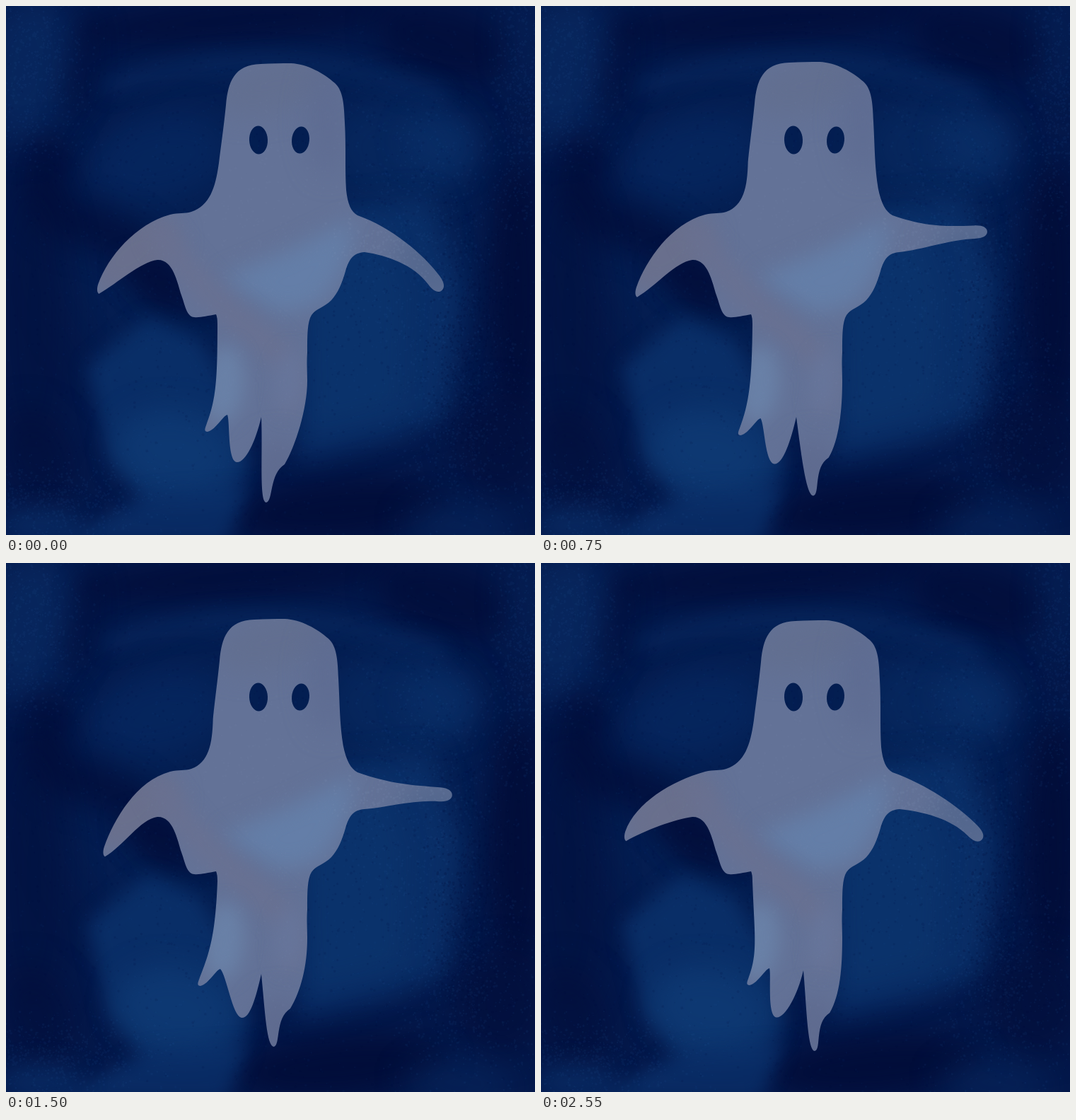
An HTML page with a canvas that plays this animation: 748 px wide and 748 px high, repeating every 2.7 s.

```html
<!DOCTYPE html>
<html lang="en">
<head>
<meta charset="utf-8">
<title>Ghost</title>
<style>
html, body { margin: 0; width: 100%; height: 100%; overflow: hidden; background: #04174a; }
canvas { display: block; width: 748px; height: 748px; }
</style>
</head>
<body>
<canvas id="stage" width="748" height="748"></canvas>
<script>
const SIZE = 748, STEP = 150, STEPS = 18, RAD = Math.PI / 180;
const ctx = document.getElementById('stage').getContext('2d');

let seed = 7;
function rnd() {
  seed = (seed * 16807) % 2147483647;
  return seed / 2147483647;
}

function layer(fill) {
  const c = document.createElement('canvas');
  c.width = c.height = SIZE;
  const g = c.getContext('2d');
  g.fillStyle = fill;
  g.fillRect(0, 0, SIZE, SIZE);
  return g;
}

// Soft painted area.
function patch(g, path, rgb, alpha, blur) {
  g.filter = `blur(${blur}px)`;
  g.fillStyle = `rgba(${rgb},${alpha})`;
  g.fill(new Path2D(path));
  g.filter = 'none';
}

function dab(g, x, y, rx, ry, turn, rgb, alpha, blur = 20) {
  patch(g, `M${x - rx * Math.cos(turn * RAD)} ${y - rx * Math.sin(turn * RAD)}
    a${rx} ${ry} ${turn} 1 1 ${2 * rx * Math.cos(turn * RAD)} ${2 * rx * Math.sin(turn * RAD)}
    a${rx} ${ry} ${turn} 1 1 ${-2 * rx * Math.cos(turn * RAD)} ${-2 * rx * Math.sin(turn * RAD)}`,
    rgb, alpha, blur);
}

function stroke(g, path, width, rgb, alpha, blur) {
  g.filter = `blur(${blur}px)`;
  g.lineWidth = width;
  g.lineCap = 'round';
  g.strokeStyle = `rgba(${rgb},${alpha})`;
  g.stroke(new Path2D(path));
  g.filter = 'none';
}

// Cloud of small specks, densest in the middle.
function specks(g, x, y, rx, ry, count, rgb, alpha) {
  g.filter = 'blur(0.6px)';
  g.fillStyle = `rgba(${rgb},${alpha})`;
  g.beginPath();
  for (let i = 0; i < count; i++) {
    const px = x + (rnd() + rnd() - 1) * rx, py = y + (rnd() + rnd() - 1) * ry;
    const r = 0.5 + rnd() * 1.5;
    g.moveTo(px + r, py);
    g.arc(px, py, r, 0, 7);
  }
  g.fill();
  g.filter = 'none';
}

const NAVY = '2,12,56', DEEP = '5,32,84', BLUE = '11,50,108', PALE = '17,64,122', DUST = '45,105,165';

function paintNight() {
  const g = layer('#04184a');
  dab(g, 380, 330, 300, 270, 0, DEEP, 0.75, 35);
  dab(g, 30, 90, 70, 110, 10, BLUE, 0.55, 25);
  dab(g, 330, 20, 230, 30, -4, NAVY, 0.75, 18);
  dab(g, 620, 50, 100, 50, 15, NAVY, 0.75, 20);
  dab(g, 110, 85, 25, 75, 15, NAVY, 0.45, 16);
  dab(g, 735, 50, 30, 80, 0, BLUE, 0.25, 20);
  stroke(g, 'M150 112Q370 40 610 125', 28, BLUE, 0.4, 13);
  dab(g, 220, 215, 100, 60, -12, '7,42,100', 0.6, 22);
  dab(g, 560, 200, 105, 75, 0, BLUE, 0.45, 24);
  dab(g, 615, 195, 55, 45, 10, BLUE, 0.5, 18);
  stroke(g, 'M60 210Q40 300 110 310T230 400', 60, NAVY, 0.7, 20);
  dab(g, 235, 400, 80, 30, 25, NAVY, 0.5, 16);
  dab(g, 40, 440, 50, 200, 0, NAVY, 0.35, 24);
  patch(g, 'M410 290L600 270L645 400L625 580L540 615L410 645Z', BLUE, 0.85, 18);
  patch(g, 'M420 320L530 300L565 400L560 570L430 600Z', PALE, 0.25, 16);
  dab(g, 724, 400, 42, 180, 0, NAVY, 0.85, 18);
  dab(g, 700, 620, 65, 75, 0, NAVY, 0.6, 22);
  dab(g, 475, 712, 150, 42, -5, NAVY, 0.85, 18);
  patch(g, 'M115 510L200 440L270 470L325 560L345 660L310 705L200 705L145 640Z', BLUE, 0.85, 13);
  dab(g, 240, 630, 85, 60, 10, PALE, 0.6, 20);
  dab(g, 45, 640, 50, 75, -20, NAVY, 0.5, 22);
  patch(g, 'M70 760L200 690L345 680L310 760Z', BLUE, 0.75, 12);
  dab(g, 50, 735, 60, 25, 0, BLUE, 0.65, 16);
  dab(g, 640, 735, 80, 35, 5, BLUE, 0.35, 20);
  specks(g, 374, 374, 480, 480, 2600, DUST, 0.05);
  specks(g, 374, 374, 480, 480, 2000, NAVY, 0.12);
  for (const [x, y, rx, ry] of [[35, 90, 110, 160], [600, 330, 130, 230], [650, 600, 130, 170],
    [60, 700, 190, 70], [730, 120, 50, 230]]) specks(g, x, y, rx, ry, 1000, DUST, 0.09);
  specks(g, 655, 480, 70, 220, 700, NAVY, 0.2);
  return g.canvas;
}

function paintSheet() {
  const g = layer('rgb(99,114,151)');
  dab(g, 380, 110, 90, 40, -15, '98,110,143', 0.8, 18);
  dab(g, 455, 160, 30, 80, 0, '92,106,143', 0.6, 18);
  dab(g, 180, 350, 70, 50, -35, '106,111,140', 0.9, 16);
  patch(g, 'M305 385L400 345L495 300L480 370L445 420L390 435Z', '100,129,171', 0.85, 15);
  stroke(g, 'M220 325Q270 400 350 460T400 560', 38, '105,113,145', 0.8, 12);
  dab(g, 308, 535, 28, 55, 5, '107,134,172', 0.75, 13);
  dab(g, 400, 530, 20, 45, 5, '102,121,160', 0.6, 12);
  dab(g, 385, 665, 40, 55, 0, '95,106,143', 0.85, 18);
  dab(g, 605, 360, 55, 60, 30, '83,102,141', 0.9, 22);
  specks(g, 380, 350, 280, 360, 1400, '130,155,190', 0.06);
  specks(g, 545, 340, 100, 60, 400, '140,165,195', 0.09);
  return g.canvas;
}

// Eased value between [step, value] keys, wrapping at the end of the loop.
function at(keys, step) {
  const loop = [...keys, [STEPS, keys[0][1]]];
  const i = loop.findIndex(k => k[0] > step);
  const [a, from] = loop[i - 1], [b, to] = loop[i];
  return from + (to - from) * (0.5 - 0.5 * Math.cos(Math.PI * (step - a) / (b - a)));
}

// Arm angles in degrees, hem offsets and the long tail's end.
const leftSwing = [[0, 43], [3, 38], [6, 49], [9, 42], [10, 49], [12, 34], [15, 51], [17, 34]];
const rightSwing = [[0, 36], [7, -10], [10, 3], [12, 28], [15, 14]];
const hemSway = [[0, 0], [4, 0], [7, -10], [10, -10], [12, 0], [15, 9], [17, 10]];
const hemDrop = [[0, 0], [4, 0], [7, 20], [10, -4], [12, 0], [15, 9], [17, -5]];
const tailX = [[0, 368], [3, 376], [7, 394], [11, 376], [17, 387]];
const tailY = [[0, 702], [4, 697], [8, 667], [10, 684], [11, 697], [15, 706], [17, 690]];

const isLeaning = step => step >= 3 && step <= 11 && step !== 9;

const headPoints = [[288, 282], [296, 258], [301, 222], [305, 190], [308, 170], [311, 140],
  [314, 108], [322, 83], [360, 82], [375, 81], [390, 81], [403, 81], [426, 82], [449, 95],
  [465, 109], [477, 120], [478, 140], [479, 165], [481, 200], [479, 230], [481, 260],
  [483, 280], [488, 291], [497, 296]];

function head(lean) {
  const moved = headPoints.map(([x, y]) => {
    const k = lean * Math.min(1, (296 - y) / 80);
    return [x - 9 * k, y - 2 * k];
  });
  return 'C' + moved.join(' ');
}

// The sleeve bends more towards its tip than at the shoulder.
function rightSleeve(angle, reach) {
  const a = angle * RAD, bend = a * 1.5;
  const tx = 505 + reach * Math.cos(a), ty = 322 + reach * Math.sin(a);
  const w = 10 + 20 * Math.min(0, bend);
  const p = (back, side) => [tx - back * Math.cos(bend) - side * Math.sin(bend),
    ty - back * Math.sin(bend) + side * Math.cos(bend)];
  return 'C' + [[545, 313], p(56, -w), p(18, -w), p(6, -w), p(0, -w * 0.6), p(0, 0),
    p(0, w * 0.6), p(6, w), p(18, w), p(53, w), [538, 345 + bend * 8], [507, 348]].join(' ');
}

function outline(step) {
  const lean = isLeaning(step) ? 1 : 0;
  const d = ['M262 291', head(lean), rightSleeve(at(rightSwing, step), 137 - 11 * lean)];
  const curve = (...p) => d.push('C' + p.join(' '));
  d.push('C491 349 485 358 480 375C475 392 470 405 460 416C450 426 438 428 432 437');
  d.push('C426 447 426 465 426 490C425 505 426 515 426 530');

  const sway = at(hemSway, step), drop = at(hemDrop, step), right = Math.max(0, sway);
  const tx = at(tailX, step), ty = at(tailY, step);
  const bx = 394 + (tx - 368) * 0.75, by = ty - 54;
  const nx = 361 + right, ny = 581 + drop * right / 10;
  const mx = 326 + Math.abs(sway) * 0.8 + drop * 0.3, my = 645 + drop / 2;
  const sx = 313 + sway, sy = 578 + drop;
  const lx = 285 + sway, ly = 602 + drop;
  curve(426, 570, bx + 15, by - 25, bx, by);
  curve(bx - 22, by + 14, tx + 10, ty - 2, tx, ty);
  curve(tx - 10, ty - 1, nx + (tx - nx) * 0.3, ny + 55, nx, ny);
  curve(nx - 8, ny + 35, mx + 12, my + 2, mx, my);
  curve(mx - 13, my - 3, sx + (mx - sx) * 0.3, sy + 9, sx, sy);
  curve(sx - 6, sy + 1, lx + 12, ly - 3, lx, ly);
  curve(lx - 5, ly, lx - 4, ly - 4, lx - 2, ly - 9);
  curve(lx + 12, ly - 45, 299 + sway * 0.3, 530, 299, 450);
  d.push('Q299 440 297 436C285 438 274 441 266 440C255 439 253 422 248 409C242 390 236 358 214 359');

  const a = at(leftSwing, step) * RAD;
  const ax = 214 - 113 * Math.cos(a), ay = 330 + 113 * Math.sin(a);
  curve(190, 362, ax + 26, ay - 15, ax, ay);
  curve(ax - 3, ay - 2, ax - 3, ay - 8, ax - 1, ay - 14);
  curve(ax + 13, ay - 53, 184, 308, 232, 295);
  d.push('C245 292 252 294 262 291Z');

  const path = new Path2D(d.join(''));
  for (const [x, r, turn] of [[357, 13, -0.04], [416.5, 12.4, 0.09]]) {
    const eye = new Path2D();
    eye.ellipse(x, 189.5, r, r * 1.54, turn, 0, 2 * Math.PI);
    path.addPath(eye);
  }
  return path;
}

const night = paintNight(), sheet = paintSheet();
const poses = Array.from({ length: STEPS }, (_, i) => outline(i));

function draw() {
  const step = Math.floor(performance.now() / STEP) % STEPS;
  ctx.drawImage(night, 0, 0);
  ctx.save();
  ctx.clip(poses[step], 'evenodd');
  ctx.drawImage(sheet, 0, 0);
  ctx.restore();
  requestAnimationFrame(draw);
}
draw();
</script>
</body>
</html>
```
